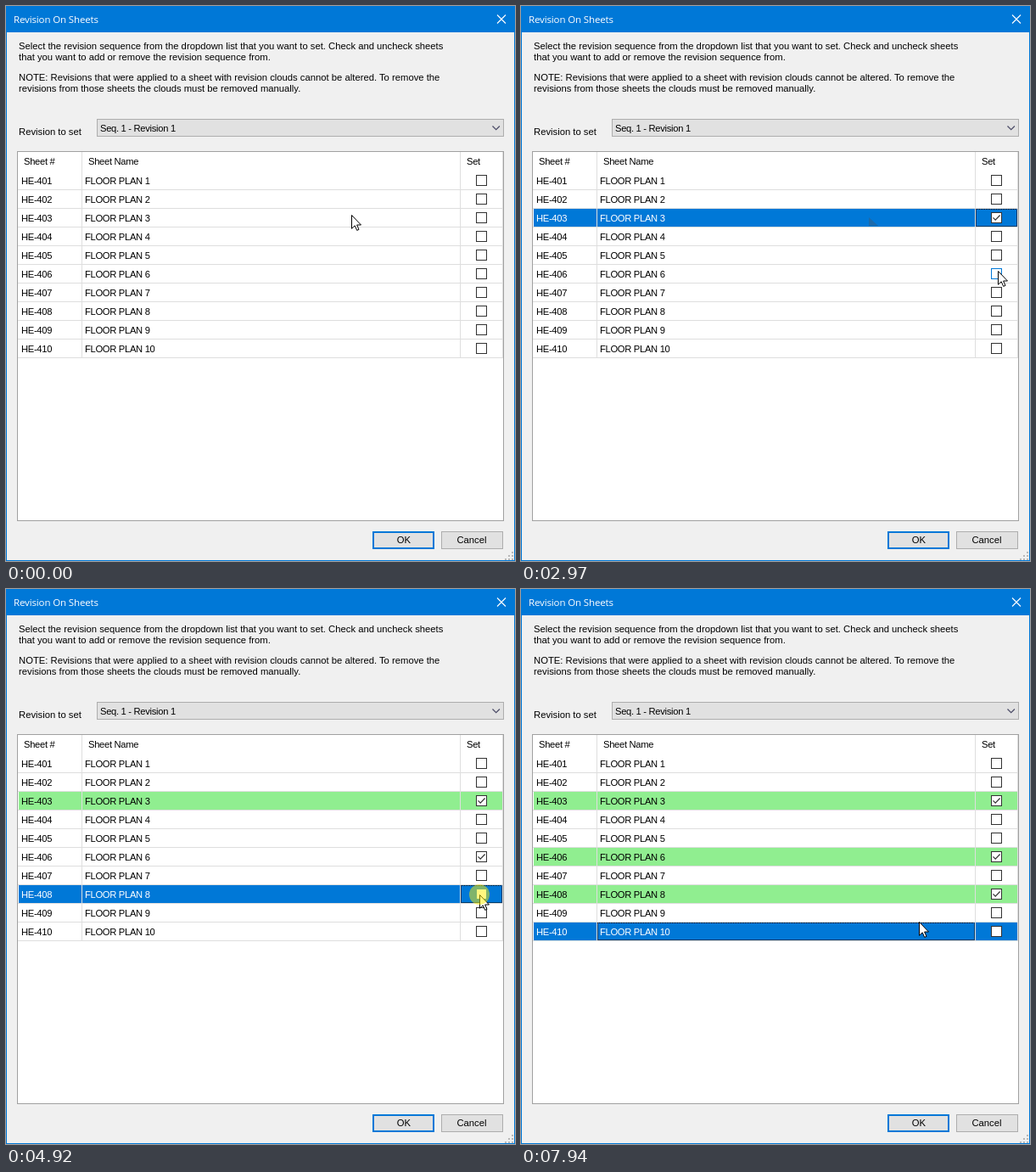
An HTML page that plays this animation: 600 by 654 pixels, repeating every 8000 ms.

```html
<!DOCTYPE html>
<html lang="en">
<head>
<meta charset="utf-8">
<title>Revision On Sheets</title>
<style>
  html, body { margin: 0; width: 100%; height: 100%; overflow: hidden; background: #f0f0f0; }
  svg { display: block; width: 600px; height: 654px; }
  text { font: 11.28px "Liberation Sans", Arial, sans-serif; white-space: pre; }
  .tight { font-size: 11.2px; letter-spacing: -.3px; }
  .title { font: 11.5px "Open Sans", "Noto Sans", sans-serif; letter-spacing: -.13px; }
  .mid { text-anchor: middle; }
</style>
</head>
<body>
<svg viewBox="0 0 600 654">
  <g id="base"></g>
  <g id="rows"></g>
  <polygon id="smudge" points="410,249 410,259 421,259" fill="#1b6aab"/>
  <path id="cursor" d="M.5 .5V16.3L4.2 12.8L6.7 18.4L9 17.4L6.6 12H11.5Z" fill="#fff" stroke="#000"/>
  <circle id="click" r="12" fill="#fff000" fill-opacity=".5"/>
</svg>
<script>
const LOOP = 8000, BLUE = '#0078d7', GREEN = '#90ee90', LINE = '#dedede';
const $ = id => document.getElementById(id);
const rect = (x, y, w, h, fill) => `<rect x="${x}" y="${y}" width="${w}" height="${h}" fill="${fill}"/>`;
const framed = (x, y, w, h, edge, fill, b = 1) =>
  rect(x, y, w, h, edge) + rect(x + b, y + b, w - 2 * b, h - 2 * b, fill);
const text = (x, y, s, cls = '', fill = '#000') =>
  `<text x="${x}" y="${y}" class="${cls}" fill="${fill}">${s}</text>`;
const stroke = (d, color, w = 1) => `<path d="${d}" fill="none" stroke="${color}" stroke-width="${w}"/>`;

function drawBase() {
  let s = rect(0, 0, 600, 654, BLUE) + rect(1, 31, 598, 622, '#f0f0f0')
    + text(9, 20, 'Revision On Sheets', 'title', '#fff')
    + stroke('M579 10.5l10 10m0-10l-10 10', '#fff', 1.1)
    + text(15, 51, 'Select the revision sequence from the dropdown list that you want to set. Check and uncheck sheets')
    + text(15, 64, 'that you want to add or remove the revision sequence from.')
    + text(15, 88, 'NOTE: Revisions that were applied to a sheet with revision clouds cannot be altered. To remove the')
    + text(15, 101, 'revisions from those sheets the clouds must be removed manually.')
    + text(15, 152, 'Revision to set')
    + framed(107, 133, 480, 21, '#adadad', '#e1e1e1')
    + text(111, 148, 'Seq. 1 - Revision 1', 'tight')
    + stroke('M573.5 141.5l4.2 4.2l4.2-4.2', '#4a4a66', 1.2)
    + framed(13, 171, 574, 436, '#a0a0a0', '#fff')
    + text(21, 187, 'Sheet #', 'tight') + text(97, 187, 'Sheet Name', 'tight') + text(543, 187, 'Set', 'tight')
    + framed(432, 619, 73, 21, BLUE, '#e1e1e1', 2) + text(469, 633, 'OK', 'mid')
    + framed(513, 619, 73, 21, '#adadad', '#e1e1e1') + text(549, 633, 'Cancel', 'mid');
  for (let i = 0; i < 3; i++)
    for (let j = 0; j <= i; j++) s += rect(596 - 4 * j, 643 + 4 * i, 2, 2, '#b8b8b8');
  $('base').innerHTML = s;
}

// Each selection: time, row, whether the Set cell has the focus
const picks = [[470, 2, false], [1570, 2, true], [3280, 5, true], [4920, 7, true], [6870, 9, false]];
const checkedAt = { 2: 1720, 5: 3430, 7: 5080 };
const greenAt = { 2: 3430, 5: 5080, 7: 7100 };
const clicks = [[470, 620], [1570, 1720], [3280, 3430], [4920, 5080], [6870, 7100]];

// Pointer moves: first step, last step, number of steps, end x, end y, sag of the path
const moves = [
  [80, 80, 1, 407, 249, 0],
  [620, 1260, 9, 558, 246, 5],
  [1400, 1400, 1, 560, 245, 0],
  [2270, 2970, 10, 562, 312, 0],
  [3980, 3980, 1, 562, 317, 0],
  [4060, 4540, 7, 558, 360, 0],
  [5870, 5870, 1, 558, 362, 0],
  [5947, 6640, 10, 477, 402, 0],
  [7880, 7940, 2, 469, 392, 0],
];

function pointer(t) {
  let x = 407, y = 246;
  for (const [from, to, n, ex, ey, sag] of moves) {
    if (t < from) break;
    const gap = n > 1 ? (to - from) / (n - 1) : 1;
    const p = Math.min(n, Math.floor((t - from) / gap + 1.001)) / n;
    const e = p * p * (3 - 2 * p);
    x += (ex - x) * e;
    y += (ey - y) * e + sag * Math.sin(Math.PI * p);
  }
  return [Math.round(x), Math.round(y)];
}

function checkbox(y, checked, hot) {
  const color = hot ? BLUE : '#333';
  return framed(554, y, 13, 13, color, '#fff')
    + (checked ? stroke(`M556.5 ${y + 6.3}l2.7 2.8l5.4-5.6`, color, 1.2) : '');
}

function drawRows(t, mx, my) {
  const pick = picks.filter(p => p[0] <= t).pop() || [0, -1, false];
  let s = '', focus = '';
  for (let i = 0; i < 10; i++) {
    const y = 195 + 22 * i, selected = pick[1] === i;
    const ink = selected ? '#fff' : '#000';
    const fill = selected ? BLUE : t >= greenAt[i] ? GREEN : '#fff';
    const hot = mx >= 554 && mx < 567 && my >= y + 4 && my < y + 17;
    s += rect(15, y, 570, 21, fill) + rect(14, y + 21, 572, 1, LINE)
      + text(18, y + 15, 'HE-' + (401 + i), 'tight', ink)
      + text(93, y + 15, 'FLOOR PLAN ' + (i + 1), 'tight', ink)
      + checkbox(y + 4, t >= checkedAt[i], hot);
    if (selected) {
      const [x, w] = pick[2] ? [536, 48] : [90, 444];
      focus = `<path d="M${x} ${y + .5}h${w}m.5 0v20m0 0h-${w}m0 0v-20" fill="none" stroke="#000" stroke-dasharray="1 1"/>`;
    }
  }
  for (const x of [89, 535, 585]) s += rect(x, 172, 1, 243, LINE);
  $('rows').innerHTML = s + focus;
}

function draw(now) {
  const t = now % LOOP, [x, y] = pointer(t);
  drawRows(t, x, y);
  $('cursor').setAttribute('transform', `translate(${x} ${y})`);
  $('click').setAttribute('transform', `translate(${x} ${y})`);
  $('click').style.display = clicks.some(([a, b]) => t >= a && t < b) ? '' : 'none';
  $('smudge').style.display = t >= 620 && t < 3280 ? '' : 'none';
}

const start = performance.now();
function tick() {
  draw(performance.now() - start);
  requestAnimationFrame(tick);
}
drawBase();
tick();
</script>
</body>
</html>
```
